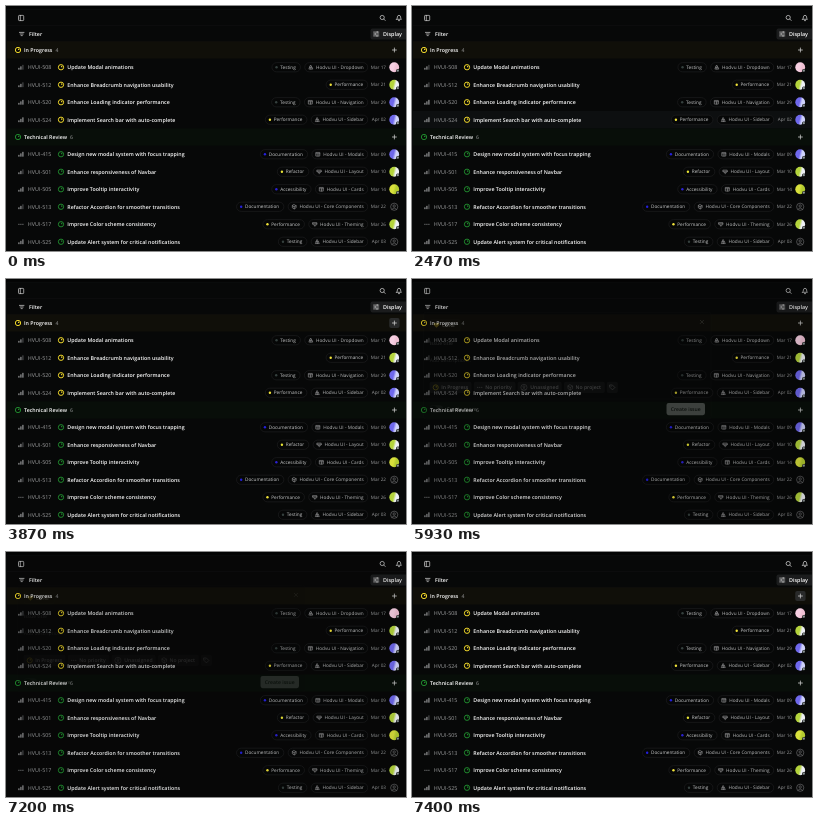
Recreate the animation shown at these times as an HTML page with a canvas. Size 400 px wide and 245 px high, loop 8 s.

```html
<!DOCTYPE html>
<html lang="en">
<head>
<meta charset="utf-8">
<title>Issue board</title>
<style>
html, body { margin: 0; width: 100%; height: 100%; overflow: hidden; background: #000; }
canvas { display: block; width: 100vw; height: 100vh; }
</style>
</head>
<body>
<canvas id="stage" width="400" height="245"></canvas>
<script>
const stage = document.getElementById('stage').getContext('2d');
const layer = new OffscreenCanvas(400, 245).getContext('2d');
let ctx = stage;

const LOOP = 8000, ROW = 17.5, HEAD = 17, TOP = 35.5;
const FONT = '"Open Sans", "Noto Sans", sans-serif';
const YELLOW = '#ecd42a', GREEN = '#1f862c', MUTED = '#9c9d9e', WHITE = '#ffffff';
const LABELS = {
  Testing: '#35403e', Performance: '#f0e23a', Documentation: '#2520dc',
  Refactor: '#e8e436', Accessibility: '#2c22d4'
};
const PINK = ['#f6cfe2', '#efc0d4'], LIME = ['#b4d43c', '#eef0f6'];
const VIOLET = ['#6f68ec', '#cfd2fb'], LEMON = ['#d8e03c', '#b4cc30'];

// id, title, label, project, project icon, date, avatar colours, priority
const groups = [
  { name: 'In Progress', count: 4, color: YELLOW, tint: '#100f09', rows: [
    [508, 'Update Modal animations', 'Testing', 'Dropdown', 'tri', 'Mar 17', PINK, 2],
    [512, 'Enhance Breadcrumb navigation usability', 'Performance', '', '', 'Mar 21', LIME, 2],
    [520, 'Enhance Loading indicator performance', 'Testing', 'Navigation', 'grid', 'Mar 29', VIOLET, 3],
    [524, 'Implement Search bar with auto-complete', 'Performance', 'Sidebar', 'tri', 'Apr 02', VIOLET, 3]
  ] },
  { name: 'Technical Review', count: 6, color: GREEN, tint: '#080e09', rows: [
    [415, 'Design new modal system with focus trapping', 'Documentation', 'Modals', 'grid', 'Mar 09', VIOLET, 3],
    [501, 'Enhance responsiveness of Navbar', 'Refactor', 'Layout', 'cup', 'Mar 10', LIME, 2],
    [505, 'Improve Tooltip interactivity', 'Accessibility', 'Cards', 'grid', 'Mar 14', LEMON, 3],
    [513, 'Refactor Accordion for smoother transitions', 'Documentation', 'Core Components', 'cube', 'Mar 22', null, 2],
    [517, 'Improve Color scheme consistency', 'Performance', 'Theming', 'cup', 'Mar 26', LIME, 0],
    [525, 'Update Alert system for critical notifications', 'Testing', 'Sidebar', 'tri', 'Apr 03', null, 3]
  ] }
];

// start time, hovered row index (-1 none, 'plus' for the add button)
const hovers = [[0, -1], [600, 9], [1070, 8], [1330, 7], [1600, 6], [1870, 5], [2000, 4],
  [2330, -1], [2470, 3], [3070, 2], [3200, 1], [3400, 0], [3670, -1], [3870, 'plus'],
  [5930, -1], [7400, 'plus']];

// start time, backdrop opacity, dialog opacity, dialog scale
const fades = [[0, 0, 0, 1], [5930, 0.14, 0.22, 0.957], [6070, 0.96, 1, 1],
  [7200, 0.07, 0.12, 0.957], [7330, 0, 0, 1]];

const at = (steps, t) => steps.filter(s => s[0] <= t).pop();

// Type is set ten times larger and scaled down for exact spacing.
function text(str, x, y, size, color, weight = 600, align = 'left') {
  ctx.save();
  ctx.translate(x, y + size * 0.36);
  ctx.scale(0.1, 0.1);
  ctx.font = `${weight} ${size * 10}px ${FONT}`;
  ctx.textRendering = 'geometricPrecision';
  ctx.textAlign = align;
  ctx.fillStyle = color;
  ctx.fillText(str, 0, 0);
  const width = ctx.measureText(str).width / 10;
  ctx.restore();
  return width;
}

function box(x, y, w, h, r, fill, stroke, line = 0.6) {
  ctx.beginPath();
  ctx.roundRect(x, y, w, h, r);
  if (fill) { ctx.fillStyle = fill; ctx.fill(); }
  if (stroke) { ctx.strokeStyle = stroke; ctx.lineWidth = line; ctx.stroke(); }
}

function dot(x, y, r, color) {
  ctx.beginPath();
  ctx.arc(x, y, r, 0, 7);
  ctx.fillStyle = color;
  ctx.fill();
}

function ring(x, y, r, color, line = 0.7) {
  ctx.beginPath();
  ctx.arc(x, y, r, 0, 7);
  ctx.strokeStyle = color;
  ctx.lineWidth = line;
  ctx.stroke();
}

function path(d, x, y, color, line = 0.7) {
  ctx.save();
  ctx.translate(x, y);
  ctx.strokeStyle = color;
  ctx.lineWidth = line;
  ctx.lineCap = ctx.lineJoin = 'round';
  ctx.stroke(new Path2D(d));
  ctx.restore();
}

function status(x, y, color) {
  ring(x, y, 2.65, color, 1);
  ctx.beginPath();
  ctx.moveTo(x, y);
  ctx.arc(x, y, 1.6, -Math.PI / 2, 0);
  ctx.fillStyle = color;
  ctx.fill();
}

function priority(x, y, level) {
  for (let i = 0; i < 3; i++) {
    const h = level ? 1.8 + i * 1.5 : 0.8;
    ctx.fillStyle = level && i >= level ? '#48494a' : '#959697';
    ctx.fillRect(x - 2.7 + i * 2, level ? y + 2.4 - h : y - 0.4, 1.2, h);
  }
}

function person(x, y, r, color) {
  ring(x, y, r, color, 0.6);
  ring(x, y - r * 0.2, r * 0.33, color, 0.6);
  path(`M${-r * 0.6} ${r * 0.72}Q0 ${-r * 0.08} ${r * 0.6} ${r * 0.72}`, x, y, color, 0.6);
}

function avatar(x, y, colors) {
  if (!colors) return person(x, y, 3.6, '#77787a');
  const g = ctx.createLinearGradient(x - 4, y - 1, x + 4, y + 1);
  g.addColorStop(0.4, colors[0]);
  g.addColorStop(0.7, colors[1]);
  dot(x, y, 4.9, g);
  dot(x + 3.6, y + 3.4, 1.7, '#070808');
  dot(x + 3.6, y + 3.4, 1.15, '#8d9697');
}

const icons = {
  tri: 'M0-1.9L1.1 0H-1.1ZM-1.1 0L-2 1.8H2L1.1 0M0 0V1.8',
  grid: 'M-1.8-1.8H1.8V1.8H-1.8ZM-1.8-.5H1.8M0-.5V1.8',
  cup: 'M-2-1.6H2V.2Q1.6 1 0 1Q-1.6 1-2 .2ZM0 1V2M-2-.4H2',
  cube: 'M0-2.1L1.9-1V1L0 2.1L-1.9 1V-1ZM-1.9-1L0 0L1.9-1M0 0V2.1'
};

function tags(label, project, icon, y) {
  const size = 4.72, h = 9.2;
  const pill = (left, right) => box(left, y - h / 2, right - left, h, h / 2, '#060707', '#232425', 0.55);
  const measure = str => {
    ctx.font = `500 ${size * 10}px ${FONT}`;
    return ctx.measureText(str).width / 10;
  };
  let right = 361.7;
  if (project) {
    const name = 'Hodvu UI - ' + project;
    const x = right - 4 - measure(name);
    pill(x - 11.3, right);
    path(icons[icon], x - 5.2, y, '#9c9d9e', 0.6);
    text(name, x, y, size, '#bcbdbe', 500);
    right = x - 15.6;
  }
  const x = right - 4.6 - measure(label);
  pill(x - 8.4, right);
  dot(x - 3.8, y, 1.2, LABELS[label]);
  text(label, x, y, size, '#cccdce', 500);
}

function toolbar() {
  box(12.5, 9.4, 5.2, 5.2, 0.8, null, '#d6d6d6', 0.7);
  path('M-.9-2.6V2.6', 15.2, 12, '#d6d6d6');
  ring(376.2, 11.5, 2.1, '#dcdcdc', 0.7);
  path('M0 0L1.4 1.4', 377.8, 13.1, '#dcdcdc');
  path('M-2.4 1.3H2.4Q1.6.6 1.6-1Q1.4-2.7 0-2.7Q-1.4-2.7-1.6-1Q-1.6.6-2.4 1.3ZM-.6 2.6H.6', 393, 12, '#dcdcdc');
  path('M-2.3-1.6H2.3M-1.5 0H1.5M-.6 1.6H.6', 15.7, 28, '#d6d6d6', 0.7);
  text('Filter', 23, 28, 5.3, WHITE);
  box(364.5, 22.6, 40, 10.8, 2, '#1b1c1d');
  path('M-2.6-1.9H2.6M-2.6 0H2.6M-2.6 1.9H2.6M1-2.6V-1.2M-1-.7V.7M.8 1.2V2.6', 370.2, 28, '#d6d6d6', 0.65);
  text('Display', 377, 28, 5.4, WHITE);
}

function board(hover) {
  ctx.fillStyle = '#030404';
  ctx.fillRect(0, 0, 400, 245);
  box(0.5, 3.2, 405, 260, 2, '#070808', '#111213', 0.5);
  ctx.fillStyle = '#0f1011';
  ctx.fillRect(1, 19.4, 399, 0.6);
  ctx.fillRect(1, 35, 399, 0.6);
  toolbar();
  let y = TOP, index = 0;
  groups.forEach((group, g) => {
    const mid = y + HEAD / 2;
    ctx.fillStyle = group.tint;
    ctx.fillRect(1, y, 399, HEAD);
    status(12, mid, group.color);
    const w = text(group.name, 18, mid, 5.3, WHITE);
    text(String(group.count), 18 + w + 3, mid, 5.2, MUTED, 400);
    if (!g && hover === 'plus') box(383.2, mid - 5, 10.4, 10, 2, '#292a2a');
    path('M-2 0H2M0-2V2', 388.4, mid, '#dedede', 0.7);
    y += HEAD;
    for (const [id, title, label, project, icon, date, colors, level] of group.rows) {
      const c = y + ROW / 2;
      if (hover === index++) {
        ctx.fillStyle = '#0d0f10';
        ctx.fillRect(1, y, 399, ROW);
      }
      priority(15, c, level);
      text('HVUI-' + id, 21.8, c, 5.4, MUTED, 500);
      status(55, c, group.color);
      text(title, 61.3, c, 5.3, WHITE);
      tags(label, project, icon, c);
      text(date, 380, c, 4.65, MUTED, 500, 'right');
      avatar(388.2, c, colors);
      y += ROW;
    }
  });
}

function chip(x, w, label, textX) {
  box(x, 103.6, w, 11.6, 2, '#232425');
  if (label) text(label, textX, 109.6, 5.3, WHITE);
}

function dialog() {
  box(5.2, 30.8, 300.4, 111.6, 2.5, '#070808', '#1b1c1c', 0.7);
  box(11.8, 38.6, 31.6, 11.6, 2, '#0a0b0c', '#1b1c1d', 0.6);
  ctx.save();
  ctx.translate(18.6, 44.4);
  ctx.fillStyle = '#f0cf27';
  ctx.fill(new Path2D('M0 2.8L-2.7 0Q-3.5-1.4-2.4-2.3Q-1-3 0-1.7Q1-3 2.4-2.3Q3.5-1.4 2.7 0Z'));
  ctx.restore();
  text('CORE', 24.3, 44.6, 5.2, WHITE);
  path('M-1.7-1.7L1.7 1.7M1.7-1.7L-1.7 1.7', 296, 41, '#aaabac', 0.7);
  text('Issue title', 11.5, 63.3, 5.2, '#7c7d7e');
  text('Add description...', 11.5, 81.2, 5.3, '#7c7d7e', 400);

  chip(11.4, 43.8, 'In Progress', 23.5);
  status(17.8, 109.4, YELLOW);
  chip(57.6, 43.6, 'No priority', 69.6);
  for (let i = 0; i < 3; i++) dot(61.7 + i * 2.1, 109.4, 0.65, '#a9aaab');
  chip(103.4, 46, 'Unassigned', 116.6);
  person(110, 109.4, 3.2, '#dcdcdc');
  chip(151.9, 42.6, 'No project', 163.9);
  path('M0-2.7L2.4-1.3V1.3L0 2.7L-2.4 1.3V-1.3ZM-2.4-1.3L0 0L2.4-1.3M0 0V2.7', 158.4, 109.4, '#d6d6d6', 0.6);
  chip(196.6, 11.6);
  path('M-2.5-2.5H0L2.6.1L.1 2.6L-2.5 0Z', 202.4, 109.4, '#dcdcdc', 0.7);
  dot(201.1, 108.1, 0.5, '#dcdcdc');

  ctx.fillStyle = '#171818';
  ctx.fillRect(5.5, 121.2, 299.8, 0.6);
  box(11.4, 128, 14.4, 8.2, 4.1, '#272829');
  dot(15.6, 132.1, 3.4, '#060707');
  text('Create more', 29, 132.3, 5.3, WHITE);
  box(259, 125.6, 40.2, 12.8, 2.2, '#f8f8f8');
  text('Create issue', 279.1, 132.2, 5.3, '#18191a', 600, 'center');
}

// The dialog is painted on its own layer so that it fades as a whole.
function drawDialog(alpha, scale) {
  ctx = layer;
  ctx.clearRect(0, 0, 400, 245);
  ctx.save();
  ctx.translate(155, 86);
  ctx.scale(scale, scale);
  ctx.translate(-155, -86);
  dialog();
  ctx.restore();
  ctx = stage;
  ctx.globalAlpha = alpha;
  ctx.drawImage(layer.canvas, 0, 0);
  ctx.globalAlpha = 1;
}

function frame(now) {
  const t = now % LOOP;
  const [, shade, alpha, scale] = at(fades, t);
  board(at(hovers, t)[1]);
  if (shade) {
    ctx.fillStyle = `rgba(0,0,0,${shade})`;
    ctx.fillRect(0, 0, 400, 245);
  }
  if (alpha) drawDialog(alpha, scale);
  requestAnimationFrame(frame);
}
requestAnimationFrame(frame);
</script>
</body>
</html>
```
